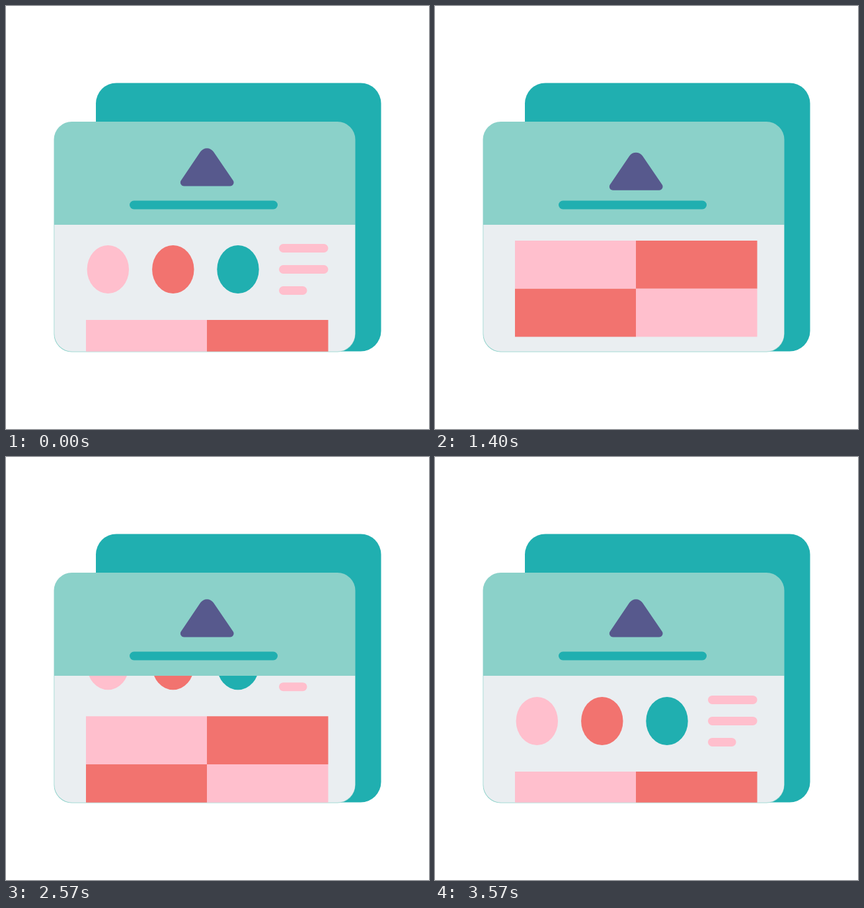
Recreate the animation shown at these times as an HTML page with a canvas. Size 640 by 640 pixels, loop 3610 ms.

```html
<!DOCTYPE html>
<html lang="en">
<head>
<meta charset="utf-8">
<title>Scrolling page</title>
<style>
  html, body { margin: 0; width: 100%; height: 100%; overflow: hidden; background: #fff; }
  canvas { display: block; width: 100vw; height: 100vh; }
</style>
</head>
<body>
<canvas id="stage" width="640" height="640"></canvas>
<script>
const ctx = document.getElementById('stage').getContext('2d');
const LOOP = 3610;
const TEAL = '#20afb0', MINT = '#8bd1c9', PAPER = '#eaeef1';
const PINK = '#ffbfcd', RED = '#f2736f', PURPLE = '#57598d';

// Each key is [time, value, slope per ms]; cubic Hermite between keys.
const SCROLL = [
  [605, 0, 0], [1270, -120, 0], [2200, -120, 0], [2330, -114.5, 0.085],
  [2570, -83, 0.2], [3000, 0, 0.05], [3200, 5.5, 0], [3700, 0, 0]
];
const BOB = [[1230, 0, 0], [1400, 6.3, 0], [1540, -8, 0], [1665, 0, 0]];

function track(keys, t) {
  if (t <= keys[0][0]) return keys[0][1];
  for (let i = 1; i < keys.length; i++) {
    const [t0, v0, m0] = keys[i - 1], [t1, v1, m1] = keys[i];
    if (t > t1) continue;
    const d = t1 - t0, u = (t - t0) / d, w = 1 - u;
    return w * w * (1 + 2 * u) * v0 + u * u * (3 - 2 * u) * v1 +
           d * u * w * (w * m0 - u * m1);
  }
  return keys[keys.length - 1][1];
}

function ease(t, start, end) {
  const u = Math.min(1, Math.max(0, (t - start) / (end - start)));
  return u * u * (3 - 2 * u);
}

function box(x, y, right, bottom, radius, color) {
  ctx.fillStyle = color;
  ctx.beginPath();
  ctx.roundRect(x, y, right - x, bottom - y, radius);
  ctx.fill();
}

function triangle(dy) {
  ctx.fillStyle = PURPLE;
  ctx.beginPath();
  ctx.moveTo(304, 272.5 + dy);
  ctx.arcTo(259, 272.5 + dy, 304, 206 + dy, 5.5);
  ctx.arcTo(304, 206 + dy, 349.5, 272.5 + dy, 12);
  ctx.arcTo(349.5, 272.5 + dy, 304, 272.5 + dy, 5.5);
  ctx.closePath();
  ctx.fill();
}

function burst(t) {
  const head = 45 + 45 * ease(t, 1530, 1800);
  const tail = 45 + 45 * ease(t, 1660, 2000);
  if (head - tail < 0.3) return;
  ctx.save();
  ctx.translate(300, 245);
  ctx.scale(1, 1.14);
  ctx.strokeStyle = PINK;
  ctx.lineWidth = 6;
  ctx.lineCap = 'round';
  ctx.beginPath();
  for (let i = 0; i < 5; i++) {
    const a = -Math.PI * i / 4, c = Math.cos(a), s = Math.sin(a);
    ctx.moveTo(c * tail, s * tail);
    ctx.lineTo(c * head, s * head);
  }
  ctx.stroke();
  ctx.restore();
}

function content(dy) {
  [[154.3, PINK], [252.8, RED], [351, TEAL]].forEach(([x, color]) => {
    ctx.fillStyle = color;
    ctx.beginPath();
    ctx.ellipse(x, 398.5 + dy, 31.7, 36.5, 0, 0, Math.PI * 2);
    ctx.fill();
  });
  [487.5, 487.5, 455.5].forEach((right, i) => {
    const y = 360 + 32 * i + dy;
    box(413, y, right, y + 13, 6.5, PINK);
  });
  for (let row = 0; row < 2; row++) {
    const y = 475 + 72.7 * row + dy;
    box(121, y, 304, y + 72.7, 0, row ? RED : PINK);
    box(304, y, 487.5, y + 72.7, 0, row ? PINK : RED);
  }
}

function draw(t) {
  ctx.fillStyle = '#fff';
  ctx.fillRect(0, 0, 640, 640);
  box(136, 116.5, 567.5, 522.5, 31, TEAL);
  box(72.5, 175, 528.5, 523.5, 27, MINT);

  ctx.save();
  ctx.beginPath();
  ctx.roundRect(73.2, 331, 455, 191.7, [0, 0, 27, 27]);
  ctx.clip();
  ctx.fillStyle = PAPER;
  ctx.fillRect(70, 331, 460, 200);
  content(track(SCROLL, t));
  ctx.restore();

  box(187, 294.5, 411, 307.5, 6.5, TEAL);
  burst(t);
  triangle(track(BOB, t));
}

function tick() {
  draw(performance.now() % LOOP);
  requestAnimationFrame(tick);
}
tick();
</script>
</body>
</html>
```
